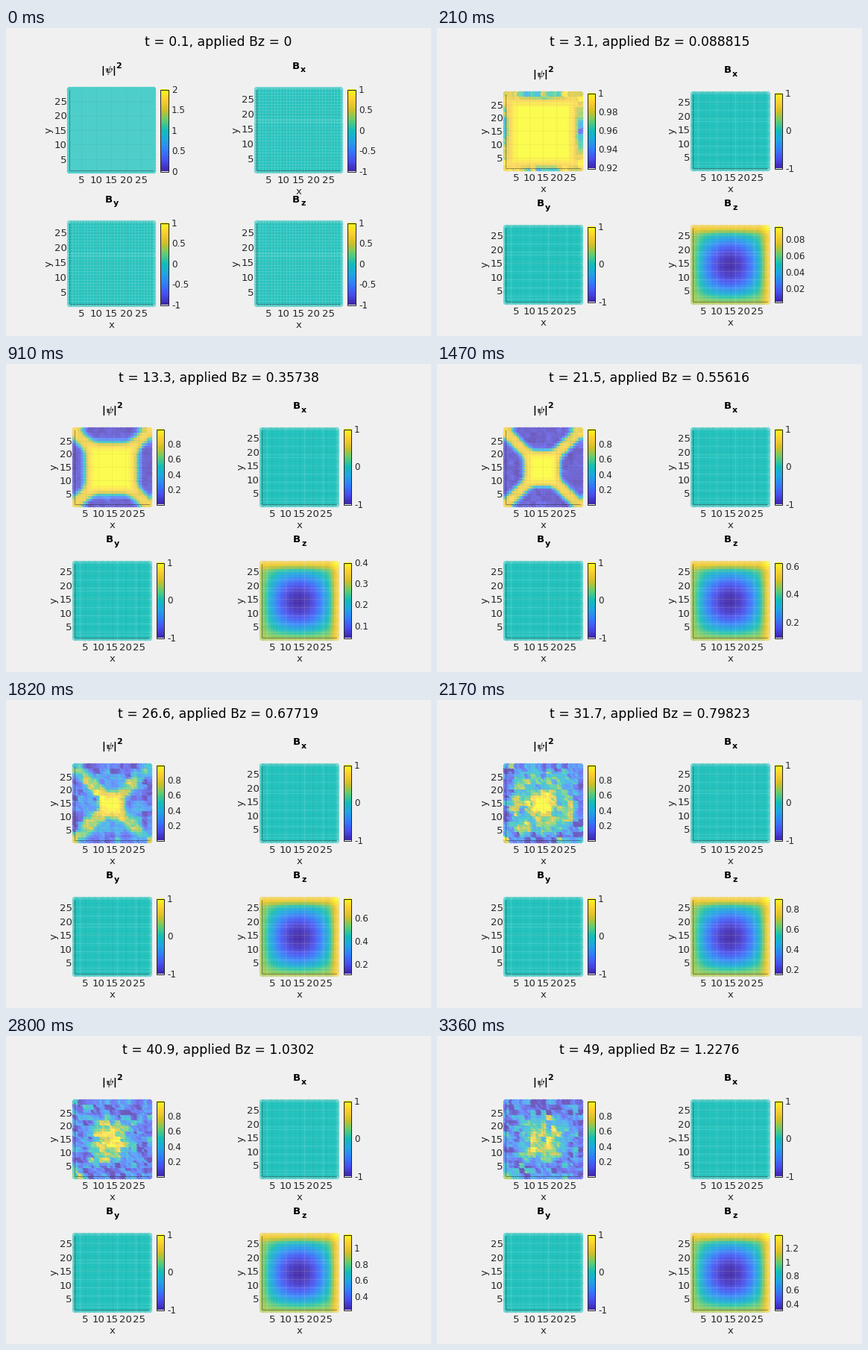
A matplotlib script that plays this animation: 570 px wide and 413 px high, repeating every 3430 ms.

```python
import math

import numpy as np
import matplotlib.pyplot as plt
from matplotlib.animation import FuncAnimation
from matplotlib.colors import LinearSegmentedColormap

W, H, DPI = 570, 413, 64
FRAMES, STEP_MS = 49, 70
PT = 72 / DPI
N = 29
INK = "#262626"
TICK, BAR_TICK, HEAD = 13.3, 12, 13.3

plt.rcParams["font.family"] = "DejaVu Sans"
plt.rcParams["mathtext.fontset"] = "cm"

CMAP = LinearSegmentedColormap.from_list("field", [
    "#3e26a8", "#484df0", "#327cfc", "#20a5e3", "#12beb9",
    "#64cd6f", "#d1bf27", "#fdcf30", "#f9fb15"])
RAMP = CMAP(np.linspace(1, 0, 256))[:, None, :3]

fig = plt.figure(figsize=(W / DPI, H / DPI), dpi=DPI, facecolor="#f0f0f0")
ax = fig.add_axes([0, 0, 1, 1])

# Blocky noise that drifts from one random field to the next
rng = np.random.default_rng(11)
NOISE = [np.kron(rng.normal(size=(15, 15)), np.ones((2, 2)))[:N, :N]
         + .5 * rng.normal(size=(N, N)) for _ in range(16)]


def noise(i):
    k, f = divmod(i / 3.5, 1)
    mix = (1 - f) * NOISE[int(k)] + f * NOISE[int(k) + 1]
    return mix / math.hypot(f, 1 - f)


def smooth(x):
    x = np.clip(x, 0, 1)
    return x * x * (3 - 2 * x)


def grid(nx, ny):
    return np.meshgrid(np.linspace(-1, 1, nx), np.linspace(-1, 1, ny))


def applied(i):
    return np.interp(i, (0, 8, 13, 21, 31, 40, 48),
                     (0, .23684, .35738, .55616, .79823, 1.0302, 1.2276))


def density(i):
    """Flux enters from the four sides, then the cross melts into vortices."""
    if i == 0:
        return np.ones((N, N)), 0, 2
    lo = max(.003, 1 - .009 * i * i)
    hi = 1 if lo > .4 else .998
    u, v = grid(N, N)
    big = np.maximum(abs(u), abs(v))
    small = np.minimum(abs(u), abs(v))

    core = .9 - .0245 * i
    rim = smooth((big - core) / max(.2, .42 - .01 * i))
    side = rim * smooth((big - small - .09) / max(.26, .9 - .045 * i))
    halo = smooth((big - core + .2) / .35)
    calm = 1 - (1 - lo) * (.18 * halo * (1 - side) + .95 * side)
    calm += .02 * rim * noise(i)

    r = (big + np.hypot(u, v)) / 2
    late = np.clip((i - 31) / 9, 0, 1)
    outer = 1 - smooth((r - .7 + .3 * late) / (.35 + .1 * late))
    inner = np.exp(-(r / (.32 + .1 * late)) ** 4)
    mixed = .18 + (.37 - .03 * late) * outer + (.45 - .17 * late) * inner
    mixed += (.15 * smooth(r / .4) * (1 - late) + .14 * late) * noise(i)
    mixed += .45 * np.exp(-((u + 1) ** 2 + (v + 1) ** 2) / .05)

    k = smooth((i - 22) / 8)
    return np.clip((1 - k) * calm + k * mixed, lo, hi), lo, hi


def field_z(i, nx, ny):
    if i == 0:
        return np.zeros((ny, nx)), -1, 1
    b = applied(i)
    lo, hi = .2247 * b ** 1.626, 1.14 * b - .006
    u, v = grid(nx, ny)
    f = .7 * (1 - (1 - u * u) * (1 - v * v))
    f += .15 * (smooth((u - .8) / .2) + smooth((v - .8) / .2))
    return lo + (hi - lo) * f, lo, hi


def nice_ticks(lo, hi, most):
    for e in range(-4, 2):
        for m in (1, 2, 5):
            step = m * 10.0 ** e
            a = math.ceil(lo / step - 1e-6)
            b = math.floor(hi / step + 1e-6)
            if b - a < most:
                return [k * step for k in range(a, b + 1)]


def label(x, y, s, size, ha="center", color=INK, **kw):
    ax.text(x, y + .36 * size, s, fontsize=size * PT, ha=ha,
            va="baseline", color=color, **kw)


def title(x, y, sub):
    bold = dict(color="k", weight="bold")
    if sub:
        label(x - 3.5, y, "B", HEAD, **bold)
        label(x + 6, y + 5.5, sub, 11, **bold)
        return
    for dx in (-11, 3.5):
        label(x + dx, y + 6, "|", HEAD, **bold)
    for dx in (-3.8, -3.3):
        label(x + dx, y + 5, r"$\psi$", 14, color="k")
    label(x + 10, y, "2", 11, **bold)


def colorbar(x, y, w, h, lo, hi, ticks):
    x, y = math.floor(x) + .5, math.floor(y) + .5
    ax.imshow(RAMP, extent=(x, x + w, y + h, y), aspect="auto",
              interpolation="nearest", zorder=1)
    ax.add_patch(plt.Rectangle((x, y), w, h, fill=False, ec=INK, lw=PT))
    for t in ticks:
        ty = y + h * (hi - t) / (hi - lo)
        label(x + w + 4.5, ty, f"{round(t, 6):g}", BAR_TICK, "left")


def panel(i, col, row, sub):
    # The plots shrink a little once the colour bars get new ticks
    x0, y0, w, h = (92.3, 88.5, 100, 99.5) if i else (85.3, 82.8, 112, 108.5)
    x0 += 251 * col
    y0 += 179 * row
    nx, ny = N, N - 1 if sub else N
    if not sub:
        data, lo, hi = density(i)
    elif sub == "z":
        data, lo, hi = field_z(i, nx, ny)
    else:
        data, lo, hi = np.zeros((ny, nx)), -1, 1

    def px(k):
        return x0 + (k - 1) * w / (nx - 1)

    def py(k):
        return y0 + h - (k - 1) * h / (ny - 1)

    ax.add_patch(plt.Rectangle((x0, y0), w, h, fc="w", ec="none", zorder=1))
    # Dots sit on whole pixels, which gives the lattice its beat
    gx, gy = np.meshgrid(np.floor(px(np.arange(1, nx + 1))) + .5,
                         np.floor(py(np.arange(1, ny + 1))) + .5)
    rgba = CMAP((data.ravel() - lo) / (hi - lo))
    if sub:
        rgba[:, 3] = .52
    else:
        rgba[:, :3] = .75 * rgba[:, :3] + .25
    ax.scatter(gx.ravel(), gy.ravel(), s=(7.5 * PT) ** 2, c=rgba,
               linewidths=0, zorder=2)

    for k in range(5, N, 5):
        ax.plot([px(k)] * 2, [y0, y0 + h], color=INK, alpha=.05, lw=PT)
        ax.plot([x0, x0 + w], [py(k)] * 2, color=INK, alpha=.05, lw=PT)
        label(px(k), y0 + h + 12, str(k), TICK)
        label(x0 - 3.5, py(k), str(k), TICK, "right")
    ax.plot([x0, x0, x0 + w], [y0, y0 + h, y0 + h], color=INK, alpha=.55,
            lw=.8 * PT)

    if i or sub:
        label(x0 + w / 2, y0 + h + 27, "x", HEAD)
    ax.text(x0 - 28.5, y0 + h / 2, "y", fontsize=HEAD * PT, rotation=90,
            ha="center", va="center", color=INK)
    title(x0 + w / 2, y0 - 33, sub)
    ticks = nice_ticks(lo, hi, 3 if i and sub in ("x", "y") else 5)
    colorbar(x0 + w + 9, y0 - .8, 10 if i else 11, round(h + 1.5),
             lo, hi, ticks)


def draw(i):
    ax.clear()
    ax.set_axis_off()
    ax.set_autoscale_on(False)
    t = math.floor(1 + 10.2 * i + 1e-6) / 10
    ax.text(W / 2, 23.7, f"t = {t:g}, applied Bz = {applied(i):.5g}",
            fontsize=17.3 * PT, ha="center", va="baseline", color="k")
    for n, sub in enumerate(("", "x", "y", "z")):
        panel(i, n % 2, n // 2, sub)
    ax.set(xlim=(0, W), ylim=(H, 0))
    return []


anim = FuncAnimation(fig, draw, frames=FRAMES, interval=STEP_MS,
                     init_func=lambda: [], repeat=True, repeat_delay=0)
plt.show()
```
